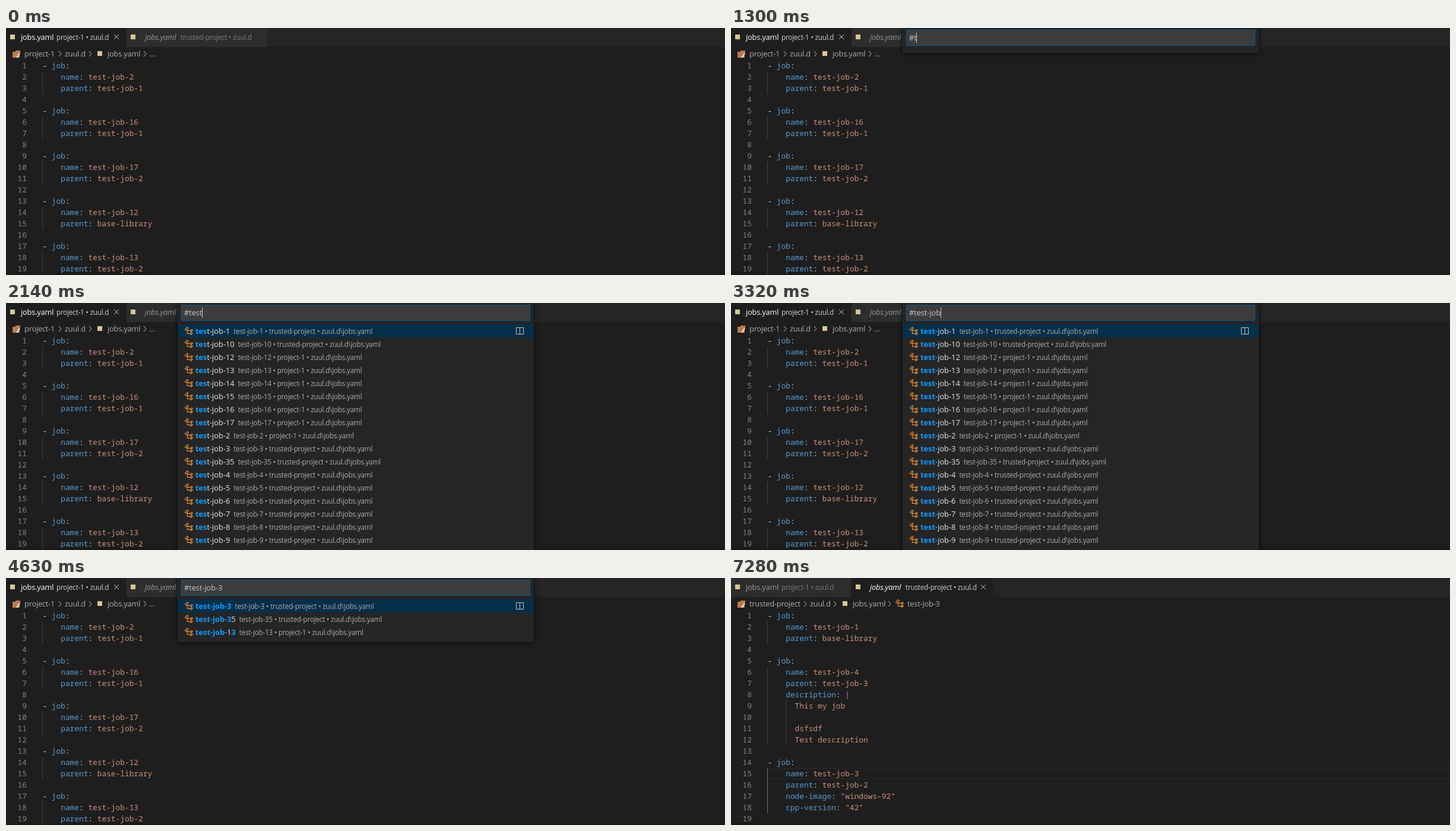
These frames come from a looping animation (1211x416 px, 7.35 s). An HTML page:

```html
<!DOCTYPE html>
<html lang="en">
<head>
<meta charset="utf-8">
<title>Workspace symbol search</title>
<style>
html, body { margin: 0; width: 100%; height: 100%; overflow: hidden; background: #1e1e1e; }
svg { display: block; width: 1211px; height: 416px; }
text { white-space: pre; font: 12.8px "Open Sans", "Noto Sans", sans-serif; letter-spacing: -.2px; fill: #adadad; }
.code { font: 500 12.83px "Noto Sans Mono", "DejaVu Sans Mono", monospace; letter-spacing: 0; fill: #ce9178; }
.num { font-weight: 400; fill: #858585; text-anchor: end; }
.key { fill: #569cd6; }
.plain { fill: #d4d4d4; }
.pipe { fill: #c586c0; }
.name { fill: #969696; }
.note { font-size: 11.7px; fill: #7c7c7c; }
.on .name { fill: #fff; }
.on .note { fill: #d0d0d0; }
.italic { font-style: italic; }
.label { font-size: 12.8px; letter-spacing: 0; fill: #e8e8e8; }
.hit { font-weight: 700; fill: #0f9bfb; }
.path { font-size: 11.7px; letter-spacing: -.2px; fill: #acacac; }
.query { font-size: 12.7px; letter-spacing: 0; fill: #ccc; }
.panel { fill: #252526; filter: drop-shadow(0 1px 4px rgba(0, 0, 0, .75)); }
.line { fill: none; stroke: #c5c5c5; }
.symbol { fill: none; stroke: #ee9030; stroke-width: 1.1; }
</style>
</head>
<body>
<svg id="stage" viewBox="0 0 1211 416"></svg>
<script>
const LOOP = 7350;
const stage = document.getElementById('stage');

const job = (name, parent, ...rest) =>
  ['- job:', `    name: ${name}`, `    parent: ${parent}`, ...rest, ''];

const views = {
  project: {
    lines: [
      ...job('test-job-2', 'test-job-1'),
      ...job('test-job-16', 'test-job-1'),
      ...job('test-job-17', 'test-job-2'),
      ...job('test-job-12', 'base-library'),
      ...job('test-job-13', 'test-job-2')
    ].slice(0, 19),
    crumbs: [[31, 'project-1'], [99, 'zuul.d'], [171, 'jobs.yaml'], [241, '...']],
    chevrons: [91, 142, 234], badge: 158
  },
  trusted: {
    lines: [
      ...job('test-job-1', 'base-library'),
      ...job('test-job-4', 'test-job-3', '    description: |', '      This my job',
        '      ', '      dsfsdf', '      Test description'),
      ...job('test-job-3', 'test-job-2', '    node-image: "windows-92"', '    cpp-version: "42"')
    ],
    crumbs: [[31, 'trusted-project'], [133, 'zuul.d'], [205, 'jobs.yaml']],
    chevrons: [125, 175], badge: 192, active: 15
  }
};

const ids = [1, 10, 12, 13, 14, 15, 16, 17, 2, 3, 35, 4, 5, 6, 7, 8, 9];
const inProject = id => id === 2 || (id >= 12 && id <= 17);

// Each step overrides part of the state from its time on.
const steps = [
  [0, { view: 'project', query: '', caret: true, hit: '', rows: [] }],
  [1070, { query: '#' }],
  [1300, { query: '#t' }],
  [1375, { rows: ids, hit: 't' }],
  [1450, { query: '#te' }],
  [1680, { query: '#tes', hit: 'te' }],
  [1910, { query: '#test' }],
  [2140, { hit: 'tes' }],
  [2460, { caret: false }],
  [2690, { query: '#test-', caret: true }],
  [2930, { query: '#test-j' }],
  [3010, { hit: 'test-' }],
  [3160, { query: '#test-jo' }],
  [3320, { query: '#test-job' }],
  [3560, { hit: 'test-job' }],
  [3850, { caret: false }],
  [4020, { query: '#test-job-', caret: true }],
  [4080, { query: '#test-job-3' }],
  [4250, { rows: [3, 35, 13], hit: 'test-job-3' }],
  [4630, { caret: false }],
  [5030, { view: 'trusted', query: '', caret: true }],
  [5100, { symbol: true }],
  [5570, { caret: false }],
  [6050, { caret: true }],
  [6510, { caret: false }],
  [7060, { caret: true }],
  [7280, { caret: false }]
];

const rect = (x, y, w, h, fill, more = '') =>
  `<rect x="${x}" y="${y}" width="${w}" height="${h}" fill="${fill}" ${more}/>`;
const text = (x, y, body, cls = '') => `<text x="${x}" y="${y}" class="${cls}">${body}</text>`;
const span = (cls, body, more = '') => `<tspan class="${cls}" ${more}>${body}</tspan>`;
const path = (d, cls, x = 0, y = 0) =>
  `<path class="${cls}" transform="translate(${x} ${y})" d="${d}"/>`;

const badge = (x, y) => rect(x - 4, y - 4, 8, 8, '#d9c596');
const leaf = 'l2.5 -2.5l1.4 1.4l-2.5 2.5z';
const symbol = (x, y) =>
  path(`M1.5 5.4L5.4 1.5L7.3 3.4L3.4 7.3ZM5.4 5.4V12.4H10.4M5.4 7.4H10.4M10.4 8${leaf}M10.4 13${leaf}`,
    'symbol', x, y);
const chevron = x => path('M0 0L4 4.5L0 9', 'line', x - 2, 39);
const folder = rect(11, 40, 12, 10, '#bd7b4c') + rect(16, 38, 8, 4, '#bd7b4c') +
  '<path d="M17 50L22 42L24 43L20 50Z" fill="#e6ddd2"/>';

function tab(x, w, on, note, italic) {
  return `<g class="${on ? 'on' : ''}">` +
    rect(x, 0, w - (on ? 0 : 1), 32, on ? '#1e1e1e' : '#2d2d2d') + badge(x + 11, 15) +
    text(x + (x ? 31 : 25), 20, 'jobs.yaml', 'name' + italic) +
    text(x + (x ? 91 : 85), 20, note, 'note') +
    (on ? path('M0 0L8 8M8 0L0 8', 'line', x + w - (x ? 20 : 21), 11) : '') + '</g>';
}

function codeLine(line, i, active) {
  const top = 54 + 19 * i;
  const indent = line.search(/\S|$/);
  const lit = active && i >= active - 1;
  const body = line.replace(/^( *)(- )?([\w-]+)(:)( \|)?/, (_, pad, dash = '', key, colon, pipe = '') =>
    pad + span('plain', dash) + span('key', key) + span('plain', colon) + span('pipe', pipe));
  return (indent >= 4 ? rect(61, top, 1, 19, lit ? '#707070' : '#404040') : '') +
    (indent >= 6 ? rect(92, top, 1, 19, '#404040') : '') +
    text(35, top + 14, i + 1, 'code num') + text(61.4, top + 14, body, 'code');
}

function editor(s) {
  const v = views[s.view];
  const trusted = s.view === 'trusted';
  let out = rect(0, 0, 1211, 416, '#1e1e1e') + rect(0, 0, 1211, 32, '#252526') +
    tab(0, 203, !trusted, 'project-1 • zuul.d', '') +
    tab(203, 238, trusted, 'trusted-project • zuul.d', ' italic') +
    folder + badge(v.badge, 43) + v.chevrons.map(chevron).join('') +
    v.crumbs.map(([x, word]) => text(x, 48, word)).join('');
  if (s.symbol) out += chevron(267) + symbol(276, 35) + text(297, 48, 'test-job-3');
  if (v.active) {
    const top = 54 + 19 * (v.active - 1);
    out += rect(62, top, 1149, 1, '#2a2a2a') + rect(62, top + 18, 1149, 1, '#2a2a2a');
  }
  out += rect(0, 412, 1211, 4, '#1a1a1a') +
    v.lines.map((line, i) => codeLine(line, i, v.active)).join('');
  return out + (v.active && s.caret ? rect(61, 320, 2, 19, '#aeafad') : '');
}

// Marks the characters of the label that match the query in order.
function mark(label, hit) {
  let n = 0;
  const runs = [];
  for (const ch of label) {
    const match = ch === hit[n];
    if (match) n++;
    const last = runs[runs.length - 1];
    if (last && last.match === match) last.body += ch;
    else runs.push({ match, body: ch });
  }
  return runs.map(r => span(r.match ? 'hit' : '', r.body)).join('');
}

function row(id, i, hit) {
  const y = 36 + 22 * i;
  const label = `test-job-${id}`;
  const place = `${label} • ${inProject(id) ? 'project-1' : 'trusted-project'} • zuul.d\\jobs.yaml`;
  return (i ? '' : rect(289, y, 600, 22, '#062f4a') + path('M.5 .5H12.5V11.5H.5ZM6.5 .5V11.5', 'line', 859, 41)) +
    symbol(300, y + 3) + text(319, y + 16, mark(label, hit) + span('path', place, 'dx="6"'), 'label');
}

function picker(s) {
  if (!s.query) return '';
  return rect(289, -10, 600, 52 + 22 * s.rows.length, '#252526', 'class="panel"') +
    rect(295.5, 3.5, 587, 26, '#3c3c3c', 'stroke="#0d5a8f"') +
    text(300, 21, s.query, 'query') +
    (s.caret ? rect(308, 8, 1, 17, '#d4d4d4', 'id="caret"') : '') +
    s.rows.map((id, i) => row(id, i, s.hit)).join('');
}

function draw(count) {
  const s = Object.assign({}, ...steps.slice(0, count).map(step => step[1]));
  stage.innerHTML = editor(s) + picker(s);
  const caret = stage.querySelector('#caret');
  if (caret) {
    const width = stage.querySelector('.query').getComputedTextLength();
    caret.setAttribute('x', Math.floor(300 + width));
  }
}

const start = performance.now();
let shown = 0;
function tick() {
  const t = (performance.now() - start) % LOOP;
  const count = steps.filter(step => step[0] <= t).length;
  if (count !== shown) draw(shown = count);
  requestAnimationFrame(tick);
}
tick();
</script>
</body>
</html>
```
